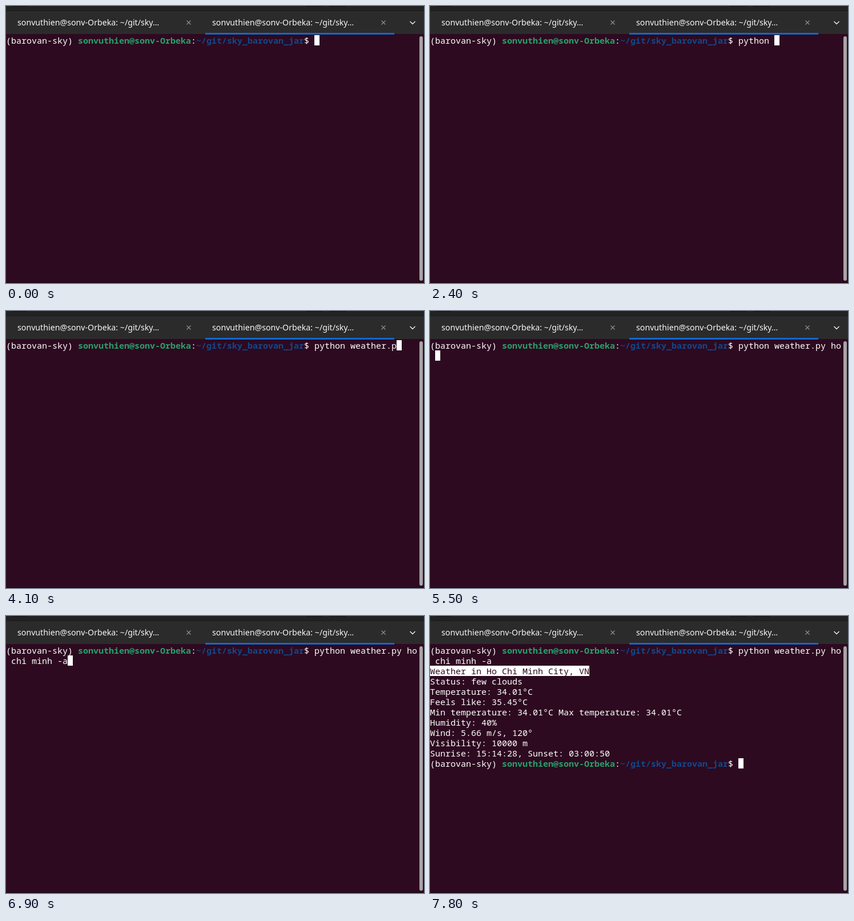
Animation, 732 px wide and 485 px high, one loop 8 s. Source, as an HTML page with a canvas:

```html
<!DOCTYPE html>
<html lang="en">
<head>
<meta charset="utf-8">
<title>Terminal</title>
<style>
  html, body { margin: 0; width: 100%; height: 100%; overflow: hidden; background: #2d0a20; }
  canvas { display: block; }
</style>
</head>
<body>
<canvas id="stage" width="732" height="485"></canvas>
<script>
const ctx = document.getElementById("stage").getContext("2d");

const LOOP = 8000;
const CELL_W = 9, CELL_H = 18, TOP = 51, COLUMNS = 80;
const COLOR = { back: "#2d0a20", text: "#ffffff", user: "#26a269", path: "#12488b" };

const ENV = "(barovan-sky) ";
const USER = "sonvuthien@sonv-Orbeka";
const PATH = "~/git/sky_barovan_jar";
const PROMPT_COLUMNS = ENV.length + USER.length + PATH.length + 3;
const TAB_TITLE = USER + ": " + PATH.slice(0, 9) + "…";

const COMMAND = "python weather.py ho chi minh -a ";
const KEY_TIMES = [
  500, 600, 800, 900, 1000, 1100, 1200,
  3100, 3300, 3400, 3500, 3500, 3600, 3700, 3900, 4100, 4200, 4300,
  5000, 5100, 5500, 5600, 5700, 5700, 5900,
  6100, 6300, 6400, 6500, 6600, 6800, 6900, 7000
];
const BACKSPACE = 7300, ENTER = 7700, REPORT = 7800;
const CURSOR_OFF = [[100, 500], [1800, 2400], [4900, 5000]];

const REPORT_TITLE = "Weather in Ho Chi Minh City, VN";
const REPORT_LINES = [
  "Status: few clouds",
  "Temperature: 34.01°C",
  "Feels like: 35.45°C",
  "Min temperature: 34.01°C Max temperature: 34.01°C",
  "Humidity: 40%",
  "Wind: 5.66 m/s, 120°",
  "Visibility: 10000 m",
  "Sunrise: 15:14:28, Sunset: 03:00:50"
];

function rect(x, y, w, h, color) {
  ctx.fillStyle = color;
  ctx.fillRect(x, y, w, h);
}

function polyline(points, color, width) {
  ctx.strokeStyle = color;
  ctx.lineWidth = width;
  ctx.beginPath();
  points.forEach(([x, y]) => ctx.lineTo(x, y));
  ctx.stroke();
}

function write(text, col, row, color = COLOR.text, bold = false) {
  ctx.font = (bold ? "bold " : "") + '15px "Noto Sans Mono", "DejaVu Sans Mono", monospace';
  ctx.fillStyle = color;
  ctx.fillText(text, col * CELL_W, TOP + row * CELL_H + 15);
}

function fillCells(col, row, count) {
  rect(col * CELL_W, TOP + row * CELL_H, count * CELL_W, CELL_H, COLOR.text);
}

function drawPrompt(row) {
  let col = 0;
  const part = (text, color, bold) => {
    write(text, col, row, color, bold);
    col += text.length;
  };
  part(ENV);
  part(USER, COLOR.user, true);
  part(":");
  part(PATH, COLOR.path, true);
  part("$");
}

function drawTab(x) {
  ctx.font = '14.2px "Noto Sans", "Open Sans", sans-serif';
  ctx.fillStyle = "#f7f7f7";
  ctx.fillText(TAB_TITLE, x, 34);
  const cx = x + 300, cy = 29, r = 3.5;
  polyline([[cx - r, cy - r], [cx + r, cy + r]], "#8c8c8c", 1.2);
  polyline([[cx + r, cy - r], [cx - r, cy + r]], "#8c8c8c", 1.2);
}

function drawWindow() {
  rect(0, 0, 732, 485, COLOR.back);
  rect(0, 0, 732, 9, "#222222");
  rect(10, 0, 27, 1, "#111111");
  rect(525, 0, 30, 1, "#111111");
  rect(566, 0, 29, 1, "#111111");
  rect(0, 8, 732, 1, "#1a1a1a");
  rect(0, 9, 732, 40, "#2b2b2b");
  rect(349, 47, 331, 3, "#1268cf");
  drawTab(20);
  drawTab(361);
  polyline([[707.5, 27], [712, 31.5], [716.5, 27]], "#f2f2f2", 1.4);

  ctx.fillStyle = "#aaa3a7";
  ctx.beginPath();
  ctx.roundRect(724, 53, 6, 428, 3);
  ctx.fill();
  rect(0, 484, 732, 1, "#14060f");
}

function drawCommand(text) {
  const room = COLUMNS - PROMPT_COLUMNS;
  write(text.slice(0, room), PROMPT_COLUMNS, 0);
  write(text.slice(room), 0, 1);
}

function drawReport() {
  fillCells(0, 2, REPORT_TITLE.length);
  write(REPORT_TITLE, 0, 2, COLOR.back);
  REPORT_LINES.forEach((line, i) => write(line, 0, 3 + i));
  drawPrompt(3 + REPORT_LINES.length);
}

function cursorCell(t, typed) {
  if (t >= REPORT) return [PROMPT_COLUMNS, 3 + REPORT_LINES.length];
  if (t >= ENTER) return [0, 2];
  const cell = PROMPT_COLUMNS + typed;
  return [cell % COLUMNS, Math.floor(cell / COLUMNS)];
}

function draw(t) {
  const typed = KEY_TIMES.filter(k => k <= t).length - (t >= BACKSPACE ? 1 : 0);
  drawWindow();
  drawPrompt(0);
  drawCommand(COMMAND.slice(0, typed));
  if (t >= REPORT) drawReport();
  if (!CURSOR_OFF.some(([from, to]) => t >= from && t < to)) {
    fillCells(...cursorCell(t, typed), 1);
  }
}

const start = performance.now();
function tick() {
  draw((performance.now() - start) % LOOP);
  requestAnimationFrame(tick);
}
tick();
</script>
</body>
</html>
```
